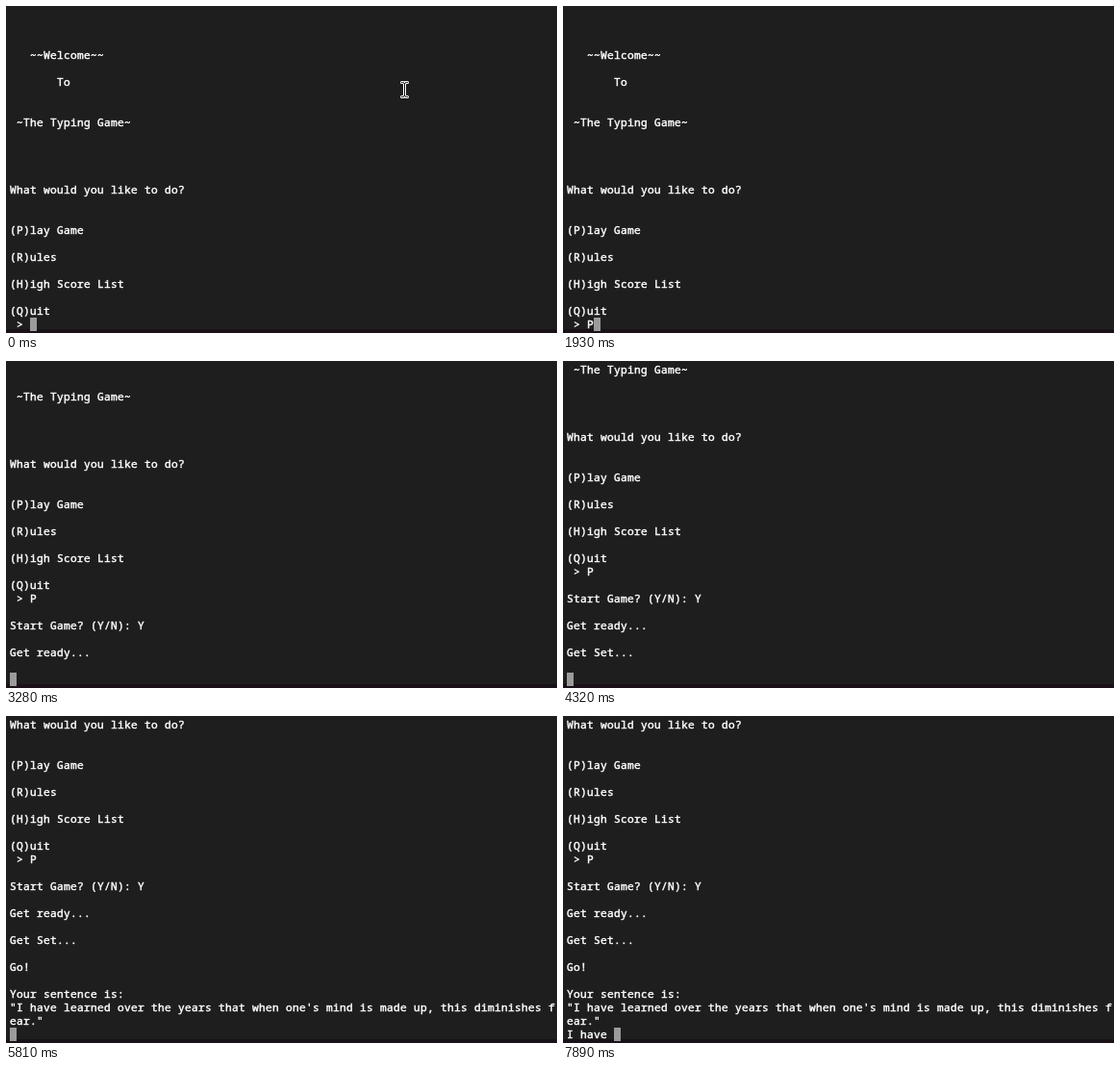
Recreate the animation shown at these times as an HTML page. Size 573 px wide and 340 px high, loop 8000 ms.

```html
<!DOCTYPE html>
<html lang="en">
<head>
<meta charset="utf-8">
<title>Typing game</title>
<style>
  html, body { margin: 0; width: 100%; height: 100%; overflow: hidden; background: #1e1e1e; }
  svg { display: block; }
  text {
    font: 11.2px "Noto Sans Mono", "DejaVu Sans Mono", monospace;
    fill: #fff; stroke: #fff; stroke-width: .45px; white-space: pre;
  }
</style>
</head>
<body>
<svg width="573" height="340" viewBox="0 0 573 340">
  <defs>
    <path id="beam" d="M-3-7.5H-2Q0-7.5 0-5.5Q0-7.5 2-7.5H3M0-5.5V5.5M-3 7.5H-2Q0 7.5 0 5.5Q0 7.5 2 7.5H3"/>
  </defs>
  <rect width="573" height="340" fill="#1e1e1e"/>
  <rect y="336" width="573" height="4" fill="#1a1118"/>
  <rect id="caret" y="324" width="7" height="14" fill="#9b9b9b"/>
  <g id="screen"></g>
  <g id="pointer" fill="none" stroke-linecap="round" stroke-linejoin="round">
    <use href="#beam" stroke="#fff" stroke-width="3"/>
    <use href="#beam" stroke="#111"/>
  </g>
</svg>
<script>
const LOOP = 8000, TICK = 149.05, LEAD = 10;
const COL = 7, ROW = 14, LEFT = 4, BASE = 13, ROWS = 24, COLS = 81;

const menu = `


   ~~Welcome~~

       To


 ~The Typing Game~




What would you like to do?


(P)lay Game

(R)ules

(H)igh Score List

(Q)uit
 > `;

const sentence = `Your sentence is:
"I have learned over the years that when one's mind is made up, this diminishes f
ear."
`;

// Terminal session: [tick, text added]
const session = [
  [0, menu],
  [13, "P"],
  [15, "\n\nStart Game? (Y/N): "],
  [21, "Y"],
  [22, "\n\nGet ready...\n\n"],
  [29, "Get Set...\n\n"],
  [36, "Go!\n\n"],
  [39, sentence],
  [46, "I"], [47, " "], [50, "ha"], [51, "v"], [52, "e"], [53, " "]
];

const $ = id => document.getElementById(id);
const screen = $("screen"), caret = $("caret"), pointer = $("pointer");

const columns = Array.from({ length: COLS }, (_, c) => LEFT + c * COL).join(" ");
const rows = Array.from({ length: ROWS }, (_, i) => {
  const el = document.createElementNS("http://www.w3.org/2000/svg", "text");
  el.setAttribute("x", columns);
  el.setAttribute("y", BASE + i * ROW);
  return screen.appendChild(el);
});

function drawScreen(tick) {
  const output = session.filter(([at]) => at <= tick).map(([, text]) => text).join("");
  const lines = output.split("\n").slice(-ROWS);
  rows.forEach((el, i) => { el.textContent = lines[i]; });
  caret.setAttribute("x", LEFT + lines.at(-1).length * COL);
}

// The pointer sweeps down in three slowing hops, then hides.
function drawPointer(tick) {
  const x = 414.5 + 28 * tick, y = 87 + 134.5 * tick - 13.5 * tick ** 2;
  pointer.setAttribute("transform", `translate(${x} ${y})`);
  pointer.style.display = tick < 3 ? "" : "none";
}

const start = performance.now();
let shown;
function frame() {
  const time = (performance.now() - start) % LOOP;
  const tick = Math.floor((time + LEAD) / TICK);
  if (tick !== shown) {
    shown = tick;
    drawScreen(tick);
    drawPointer(tick);
  }
  requestAnimationFrame(frame);
}
frame();
</script>
</body>
</html>
```
